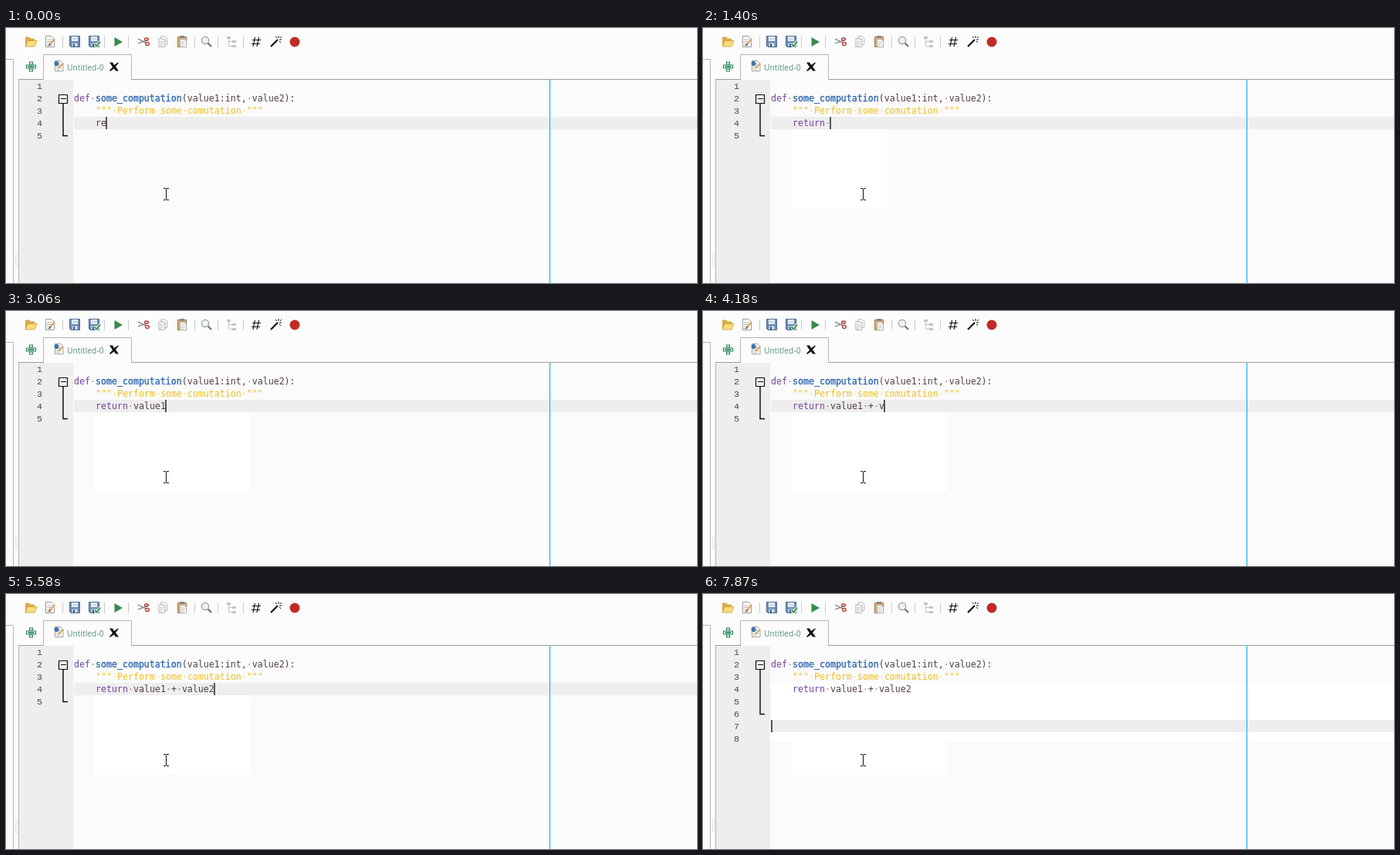
These frames come from a looping animation (895x330 px, 8000 ms). An HTML page:

```html
<!DOCTYPE html>
<html lang="en">
<head>
<meta charset="utf-8">
<title>Editor completion</title>
<style>
  html, body { margin: 0; width: 100%; height: 100%; overflow: hidden; background: #fcfcfc; }
  svg { display: block; }
  text { white-space: pre; }
  .code { font: 11.627px "DejaVu Sans Mono", monospace; fill: #54403f; }
  .num, .item { font: 11.667px "Liberation Mono", monospace; fill: #4c4444; }
  .item { fill: #000; }
  .tab { font: 10.3px "Open Sans", sans-serif; fill: #559080; }
  .kw { fill: #74419f; }
  .fn { fill: #2f67ae; stroke: #2f67ae; stroke-width: .35px; }
  .doc { fill: #f0bd20; }
  .dot { fill-opacity: .6; }
  .line { fill: none; stroke: #b4b4b4; }
  .ink { fill: none; stroke: #111; }
</style>
</head>
<body>
<svg width="895" height="330" viewBox="0 0 895 330">
  <defs>
    <g id="sheet">
      <path d="M.5 .5H8L11.5 4V14.5H.5Z" fill="#fff" stroke="#999"/>
      <path d="M2 5H9M2 7.5H9M2 10H9M2 12.5H7" stroke="#b4b4b4"/>
    </g>
    <g id="disk">
      <path d="M.5 .5H13.5V14.5H2L.5 13Z" fill="#6a8db8" stroke="#4a6a92"/>
      <path d="M3 1H11V7H3Z" fill="#f4f7fa"/>
      <path d="M4 3H10M4 5H10" stroke="#b6c3d2"/>
      <path d="M3.5 9.5H10.5V14H3.5Z" fill="#d5dce4"/>
      <path d="M5 10.5H7V14H5Z" fill="#34516f"/>
    </g>
    <g id="variable" fill="none" stroke="#1878c0" stroke-width="1.2">
      <path d="M3 1H.6V10H3M11 1H13.4V10H11"/>
      <path d="M4 5L7.5 2.8L10.5 4.2V6.5L6.8 8.5L4 7.2ZM4 5L6.8 6.2L10.5 4.2M6.8 6.2V8.5"/>
    </g>
    <g id="class" fill="none" stroke="#e08a2c" stroke-width="1.2">
      <path d="M1 4L4 1L7 3.5L4 6.5ZM5.5 5H9M6.5 5V10H9"/>
      <path d="M9 5L11 3.5L13 5L11 6.8ZM9 10L11 8.5L13 10L11 11.8Z"/>
    </g>
  </defs>

  <rect width="895" height="330" fill="#fcfcfc"/>

  <!-- toolbar -->
  <path d="M73.5 11V25M127.5 11V25M158.5 11V25M244.5 11V25M274.5 11V25M307.5 11V25" stroke="#cacaca"/>
  <g transform="translate(24 10)">
    <path d="M1 14V1.5H6L8 3.5H13V14Z" fill="#d9ac48"/>
    <path d="M1 14L4 6.5H16L13 14Z" fill="#fbdc78" stroke="#c99a3a" stroke-width=".8"/>
  </g>
  <use href="#sheet" x="51" y="10"/>
  <path d="M57 21L63 14" stroke="#dda45a" stroke-width="2"/>
  <path d="M55.5 23L57.5 20.5" stroke="#70452c" stroke-width="1.5"/>
  <use href="#disk" x="82" y="10"/>
  <use href="#disk" x="107" y="10"/>
  <path d="M115 21L117.5 23.5L122 17.5" fill="none" stroke="#e9f6e9" stroke-width="4"/>
  <path d="M115 21L117.5 23.5L122 17.5" fill="none" stroke="#3c9151" stroke-width="2"/>
  <path d="M140.5 12L151 18L140.5 24Z" fill="#388b4c"/>
  <path d="M171 14L181 19M171 20L185 15" stroke="#777" stroke-width="1.3"/>
  <g fill="none" stroke="#b33a39" stroke-width="1.3"><ellipse cx="183" cy="20.5" rx="2.3" ry="2"/><ellipse cx="182" cy="14.5" rx="2.5" ry="1.5"/></g>
  <use href="#sheet" transform="translate(200.5 10.5) scale(.72 .75)"/>
  <use href="#sheet" transform="translate(197.5 13.5) scale(.72 .75)"/>
  <path d="M222.5 11.5H233.5V24.5H222.5Z" fill="#dcb273" stroke="#a07a45"/>
  <path d="M225 10H231V13H225Z" fill="#888"/>
  <use href="#sheet" transform="translate(225 14) scale(.75)"/>
  <path d="M261.5 19.5L266 24" stroke="#81644d" stroke-width="2"/>
  <circle cx="258" cy="16" r="4.6" fill="#eef2f5" stroke="#949ca3" stroke-width="1.2"/>
  <path d="M288.5 14V23.5H293M288.5 17.5H293" fill="none" stroke="#c2c2c2"/>
  <path d="M286 11H291V14H286ZM293 16H298V19H293ZM293 22H298V25H293Z" fill="#c4c4c4"/>
  <path d="M322.5 12L320 24M327.5 12L325 24M319 15.5H330M318 20.5H329" class="ink" stroke-width="1.2"/>
  <path d="M343 24L352 15" class="ink" stroke-width="2.2"/>
  <path d="M353 10V13M357 15H354M349 11L351 13M357 11L355 13M356 19L354 17" class="ink"/>
  <circle cx="374" cy="18" r="6.5" fill="#c12b25"/>

  <!-- panel frame and tab -->
  <path d="M0 40.5H9.5V330M16.5 330V66.5M48.5 66.5V34.5H162.5V66.5" class="line"/>
  <path d="M16 66.5H49M162 66.5H895" stroke="#a0a0a0"/>
  <path d="M12.5 292V308M14.5 293V309" stroke="#c8c8c8" stroke-dasharray="1 2"/>
  <g transform="translate(0 -.5)">
    <path d="M30.5 44.5H34.5V48.5H38.5V52.5H34.5V56.5H30.5V52.5H26.5V48.5H30.5Z" fill="#fff" stroke="#2e8056" stroke-width="1.2"/>
    <path d="M32.5 46.5V54.5M28.5 50.5H36.5" stroke="#3c9b6a" stroke-width="1.8"/>
  </g>
  <use href="#sheet" transform="translate(63 42) scale(.95)"/>
  <path d="M68 52L74 46" stroke="#dca45a" stroke-width="2"/>
  <circle cx="65.5" cy="46" r="3" fill="#3f75ad"/>
  <text x="79" y="55" class="tab">Untitled-0</text>
  <path d="M134 44.5H138L140 48L145 44.5L146 45L142 50L146 55.5H142L140 52.5L135 56L134 55L138 50.5Z" fill="#111"/>

  <!-- editor -->
  <rect x="17" y="67" width="878" height="263" fill="#fbfbfb"/>
  <rect id="ghost" x="115" y="131" height="103" fill="#fff"/>
  <rect id="band" x="88" y="115" width="807" fill="#fff"/>
  <rect x="17" y="67" width="70" height="263" fill="#eee"/>
  <rect id="current" x="88" width="807" height="16" fill="#eee"/>
  <path d="M704.5 67V330" stroke="#03a9f4"/>
  <g id="numbers" class="num"></g>
  <path id="fold" class="ink" stroke-width="1.5"/>
  <path d="M68.5 86.5H79.5V97.5H68.5ZM71 91.5H78" class="ink" stroke-width="1.2"/>
  <g id="code" class="code"></g>
  <rect id="caret" width="2" height="16" fill="#555"/>
  <g id="popup"></g>
  <path id="beam" d="M204 207.5H207M208 207.5H211M207.5 208V222M204 222.5H207M208 222.5H211" class="ink"/>
  <path id="arrow" d="M205.5 214.5V230.5L209.2 227L211.8 233L214.2 232L211.6 226.2H216.5Z" fill="#fff" stroke="#111"/>
</svg>
<script>
const LOOP = 8000, LEFT = 88, CHAR = 7, ROW = 16;
const $ = id => document.getElementById(id);
const rowTop = row => 67 + ROW * (row - 1);
const show = (el, on) => el.setAttribute("visibility", on ? "visible" : "hidden");
const set = (el, attrs) => Object.entries(attrs).forEach(([key, value]) => el.setAttribute(key, value));

const keywordList = { x: 115, width: 120, items: ["return"], ghost: 124 };
const valueList = { x: 164, width: 148, items: ["value1", "value2", "ValueError"], ghost: 201 };

// Each step changes the state before it; the caret shows unless switched off.
const steps = [
  [0, { typed: "re", row: 4, col: null, lines: 5, foldRow: 5, band: 0, ghost: 0, popup: null, selected: 0, arrow: false }],
  [150, { typed: "ret" }],
  [580, { caret: false }],
  [990, { typed: "retu", popup: keywordList, ghost: keywordList.ghost, arrow: true }],
  [1140, { typed: "retur" }],
  [1270, { typed: "return", popup: null, arrow: false }],
  [1400, { typed: "return " }],
  [1690, { typed: "return v" }],
  [1810, { typed: "return va" }],
  [1960, { typed: "return val" }],
  [2340, { typed: "return value", popup: valueList, ghost: valueList.ghost, arrow: true }],
  [2910, { caret: false }],
  [3060, { typed: "return value1", popup: null, arrow: false }],
  [3630, { caret: false }],
  [3780, { typed: "return value1 " }],
  [3900, { typed: "return value1 +" }],
  [4050, { typed: "return value1 + " }],
  [4180, { typed: "return value1 + v" }],
  [4460, { typed: "return value1 + val" }],
  [4580, { typed: "return value1 + valu", arrow: true }],
  [4730, { typed: "return value1 + value", popup: valueList }],
  [5280, { selected: 1, caret: false }],
  [5580, { typed: "return value1 + value2", popup: null, arrow: false }],
  [6140, { row: 5, col: 4, lines: 6, band: 44 }],
  [6290, { row: 6, lines: 7, foldRow: 6, band: 60 }],
  [6730, { col: 0, foldRow: 5 }],
  [6890, { row: 5, col: 4, lines: 6 }],
  [7320, { row: 6, lines: 7, foldRow: 6 }],
  [7570, { row: 7, lines: 8, foldRow: 7, band: 76 }],
  [7870, { col: 0, foldRow: 6 }]
];
let last = {};
const states = steps.map(([time, change]) => last = { ...last, caret: true, ...change, time });

const span = (cls, text) => `<tspan class="${cls}">${text}</tspan>`;
const dots = text => text.replace(/ /g, span("dot", "·"));
const codeLine = (row, col, content) =>
  `<text x="${LEFT + col * CHAR}" y="${rowTop(row) + 12}">${content}</text>`;

const header =
  codeLine(2, 0, span("kw", "def") + dots(" ") + span("fn", "some_computation") + dots("(value1:int, value2):")) +
  codeLine(3, 4, span("doc", dots('""" Perform some comutation """')));

function typedLine(typed) {
  const keyword = typed.startsWith("return") ? "return" : "";
  return codeLine(4, 4, span("kw", keyword) + dots(typed.slice(keyword.length)));
}

function popupMarkup({ x, width, items }, selected) {
  const height = items.length * ROW + 5;
  const rows = items.map((item, i) => {
    const y = 133 + i * ROW;
    const mark = i === selected
      ? `<rect x="${x + 1}" y="${y}" width="${width - 2}" height="16" fill="#c9dbf8"/>
         <rect x="${x + 23.5}" y="${y + .5}" width="${width - 25}" height="15" fill="none" stroke="#a9c0e4"/>` : "";
    const icon = item === "ValueError" ? "class" : "variable";
    return `${mark}<use href="#${icon}" x="${x + 5}" y="${y + 3}"/>
      <text class="item" x="${x + 26}" y="${y + 13}">${item}</text>`;
  }).join("");
  return `<rect x="${x + 3}" y="135" width="${width}" height="${height}" fill="#000" opacity=".22"/>
    <rect x="${x + 2}" y="134" width="${width}" height="${height}" fill="#000" opacity=".4"/>
    <rect x="${x + .5}" y="132.5" width="${width - 1}" height="${height}" fill="#fff" stroke="#999"/>${rows}`;
}

$("numbers").innerHTML = Array.from({ length: 8 }, (_, i) =>
  `<text x="40" y="${rowTop(i + 1) + 12}">${i + 1}</text>`).join("");

function render(state) {
  const top = rowTop(state.row);
  const col = state.col ?? 4 + state.typed.length;
  $("code").innerHTML = header + typedLine(state.typed);
  set($("current"), { y: top });
  set($("caret"), { x: Math.max(LEFT, LEFT + col * CHAR - 1), y: top });
  set($("ghost"), { width: state.ghost });
  set($("band"), { height: state.band });
  set($("fold"), { d: `M74 98V${rowTop(state.foldRow) + 8.5}H80` });
  [...$("numbers").children].forEach((el, i) => show(el, i < state.lines));
  $("popup").innerHTML = state.popup ? popupMarkup(state.popup, state.selected) : "";
  show($("caret"), state.caret);
  show($("arrow"), state.arrow);
  show($("beam"), !state.arrow);
}

let shown;
function tick() {
  const time = performance.now() % LOOP;
  const state = states.findLast(s => s.time <= time);
  if (state !== shown) render(shown = state);
  requestAnimationFrame(tick);
}
tick();
</script>
</body>
</html>
```
